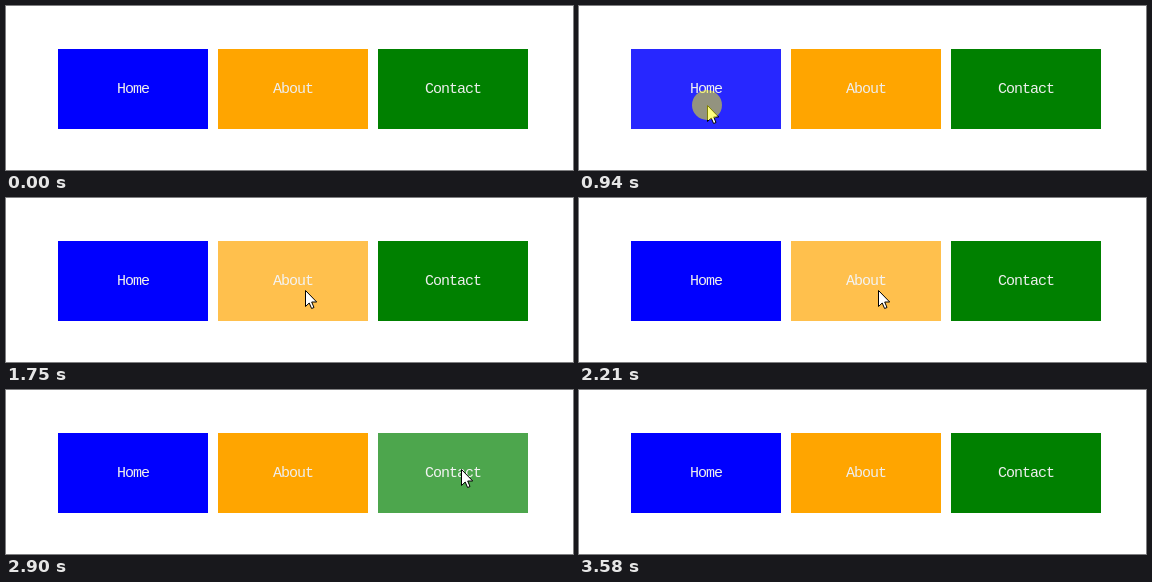
An HTML page that plays this animation: 567 px wide and 164 px high, repeating every 4040 ms.

```html
<!DOCTYPE html>
<html lang="en">
<head>
<meta charset="utf-8">
<title>Menu hover</title>
<style>
html, body { margin: 0; width: 100%; height: 100%; overflow: hidden; background: #fff; }
nav { position: absolute; left: 52px; top: 43px; display: flex; gap: 10px; }
nav div {
  width: 150px; height: 80px; color: #eee; text-align: center;
  font: 15px/82px "Liberation Mono", monospace; letter-spacing: -1px;
}
nav div, .cursor, .click { animation: 4040ms step-end infinite; }
.home { background: blue; animation-name: home; }
.about { background: orange; animation-name: about; }
.contact { background: green; animation-name: contact; }
.cursor { position: absolute; left: 0; top: 0; width: 14px; height: 21px; animation-name: move; }
.click {
  position: absolute; left: -15px; top: -15px; width: 30px; height: 30px;
  border-radius: 50%; background: rgba(255, 255, 0, .5); animation-name: click;
}
.cursor svg { position: absolute; left: 0; top: 0; }

/* Hover shows .7, pressed shows .85 */
@keyframes home {
  0% { opacity: 1; }
  13.36% { opacity: .7; }
  23.26% { opacity: .85; }
  34.65% { opacity: .7; }
  38.11%, 100% { opacity: 1; }
}
@keyframes about {
  0% { opacity: 1; }
  38.11% { opacity: .7; }
  49.75% { opacity: .85; }
  54.7% { opacity: .7; }
  66.58%, 100% { opacity: 1; }
}
@keyframes contact {
  0% { opacity: 1; }
  66.58% { opacity: .7; }
  74.99% { opacity: .85; }
  81.43% { opacity: .7; }
  86.88%, 100% { opacity: 1; }
}
@keyframes click {
  0% { visibility: hidden; }
  23.26% { visibility: visible; }
  28.21% { visibility: hidden; }
  49.75% { visibility: visible; }
  54.7% { visibility: hidden; }
  74.99% { visibility: visible; }
  81.43%, 100% { visibility: hidden; }
}
@keyframes move {
  0% { transform: translate(-40px, -40px); }
  8.16% { transform: translate(196px, 142px); }
  9.9% { transform: translate(174px, 128px); }
  11.63% { transform: translate(154px, 115px); }
  13.36% { transform: translate(140px, 106px); }
  15.09% { transform: translate(132px, 101px); }
  18.31% { transform: translate(128px, 99px); }
  34.65% { transform: translate(165px, 100px); }
  36.38% { transform: translate(219px, 99px); }
  38.11% { transform: translate(250px, 97px); }
  39.85% { transform: translate(275px, 95px); }
  41.58% { transform: translate(292px, 93px); }
  43.31% { transform: translate(299px, 92px); }
  59.65% { transform: translate(303px, 92px); }
  61.38% { transform: translate(318px, 91px); }
  63.11% { transform: translate(345px, 89px); }
  64.85% { transform: translate(380px, 86px); }
  66.58% { transform: translate(412px, 83px); }
  68.31% { transform: translate(437px, 81px); }
  70.04% { transform: translate(450px, 80px); }
  71.78% { transform: translate(455px, 79px); }
  86.88% { transform: translate(462px, 129px); }
  88.61%, 100% { transform: translate(-40px, -40px); }
}
</style>
</head>
<body>
<nav>
  <div class="home">Home</div>
  <div class="about">About</div>
  <div class="contact">Contact</div>
</nav>
<div class="cursor">
  <svg width="14" height="21">
    <path d="M.5 .5V16.5L4.2 13L6.6 18.5L9 17.5L6.7 12H11.7Z" fill="#fff" stroke="#000"/>
  </svg>
  <div class="click"></div>
</div>
</body>
</html>
```
